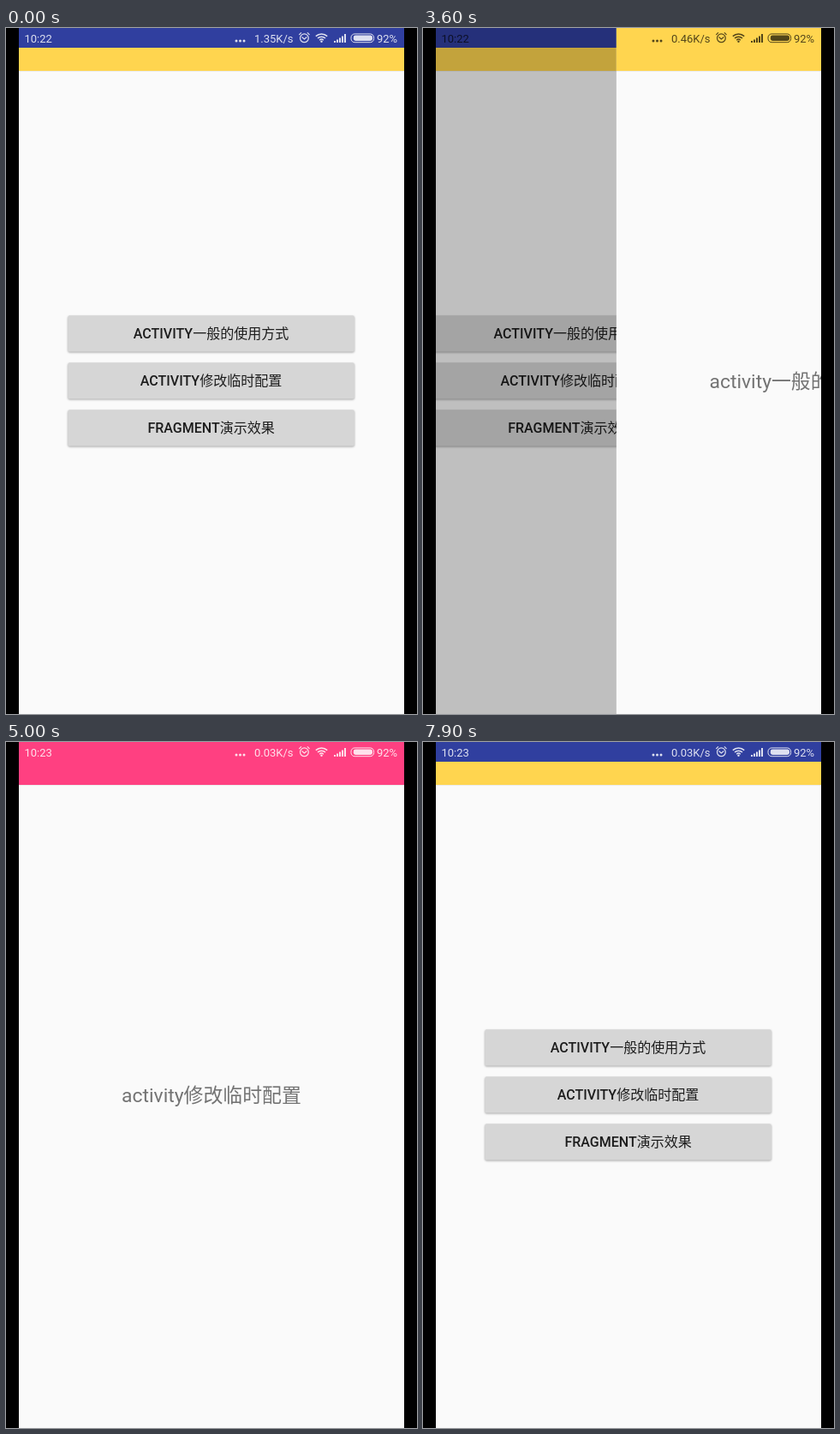
Animation, 480 px wide and 800 px high, one loop 8000 ms. Source, as an HTML page:

```html
<!DOCTYPE html>
<html lang="zh-CN">
<head>
<meta charset="utf-8">
<title>Page transitions</title>
<style>
  html, body { margin: 0; width: 100%; height: 100%; overflow: hidden; background: #000; }
  svg { display: block; width: 480px; height: 800px; }
  text { font-family: Roboto, "Noto Sans CJK SC", "Noto Sans CJK", sans-serif; }
  .label { font-size: 16.04px; text-anchor: middle; fill: #1c1c1c; }
  .label tspan { font-weight: 500; }
  .title { font-size: 22.9px; text-anchor: middle; fill: #737373; }
  .face { fill: #d6d6d6; filter: drop-shadow(0 1.3px 1.2px rgba(0, 0, 0, .32)); }
  .face.pressed { filter: drop-shadow(0 2.6px 2.4px rgba(0, 0, 0, .36)); }
  .line { fill: none; stroke: currentColor; }
  #status { fill: currentColor; font-size: 13px; }
</style>
</head>
<body>
<svg viewBox="0 0 480 800">
  <defs>
    <clipPath id="screen"><rect x="15" width="450" height="800"/></clipPath>
  </defs>
  <rect width="480" height="800"/>
  <g clip-path="url(#screen)">
    <g id="home">
      <rect x="15" width="450" height="800" fill="#fafafa"/>
      <rect x="15" width="450" height="23" fill="#303f9f"/>
      <rect x="15" y="23" width="450" height="27" fill="#ffd54f"/>
      <rect x="15" y="50" width="450" height="1" opacity=".06"/>
    </g>
    <rect id="dim" x="15" width="450" height="800"/>
    <g id="page">
      <rect x="15" width="450" height="800" fill="#fafafa"/>
      <rect id="bar" x="15" width="450" height="50"/>
      <rect x="15" y="50" width="450" height="1" opacity=".06"/>
      <text id="title" class="title" x="240" y="420.3"></text>
    </g>
    <g id="status">
      <text id="clock" x="21.5" y="17"></text>
      <text id="speed" x="335.5" y="17" text-anchor="end"></text>
      <text x="433" y="16.7">92%</text>
      <circle cx="269" cy="15" r="1.5"/>
      <circle cx="273.5" cy="15" r="1.5"/>
      <circle cx="278" cy="15" r="1.5"/>
      <g class="line" stroke-width="1.2" stroke-linecap="round">
        <circle cx="348.4" cy="11.8" r="4.9"/>
        <path d="M345.8 10.8l2.6 2.2 2.6-2.2M342.6 7.6l2-2M354.2 7.6l-2-2"/>
      </g>
      <g class="line" stroke-width="1.5">
        <path d="M361.8 9.6a9.6 9.6 0 0 1 13.4 0M364 12a6.4 6.4 0 0 1 9 0M366.2 14.2a3.3 3.3 0 0 1 4.6 0"/>
      </g>
      <circle cx="368.5" cy="15.8" r="1.2"/>
      <path d="M383 15h2v2h-2zM386 13.4h2V17h-2zM389 11.4h2V17h-2zM392 9.4h2V17h-2zM395 7h2v10h-2z"/>
      <rect class="line" x="403" y="6.9" width="26.6" height="9.8" rx="4.2"/>
      <rect x="405.8" y="8.6" width="22.2" height="6.4" rx="2.4"/>
    </g>
  </g>
</svg>
<script>
const LOOP = 8000, STEP = 100, SLIDE = 300, LAG = 11;
const $ = id => document.getElementById(id);

const buttons = [
  ['ACTIVITY', '一般的使用方式'],
  ['ACTIVITY', '修改临时配置'],
  ['FRAGMENT', '演示效果']
];
const visits = [
  { press: 1390, hold: 210, open: 1476, close: 3456, x: 340, y: 367,
    bar: '#ffd54f', title: 'activity一般的使用方式' },
  { press: 4390, hold: 110, open: 4670, close: 6677, x: 300, y: 414,
    bar: '#ff4081', title: 'activity修改临时配置' }
];
const speeds = [[0, '1.35'], [100, '0.45'], [3000, '0.46'], [4400, '0.03']];
const swaps = [1810, 3810];   // status icons turn dark, then light again

$('home').insertAdjacentHTML('beforeend', buttons.map(([latin, cjk], i) => {
  const y = 335.2 + 55 * i;
  return `<clipPath id="clip${i}"><rect x="72.3" y="${y}" width="334.6" height="42.3" rx="2"/></clipPath>
    <rect class="face" id="face${i}" x="72.3" y="${y}" width="334.6" height="42.3" rx="2"/>
    <g clip-path="url(#clip${i})"><circle id="ripple${i}" opacity=".06"/></g>
    <text class="label" x="239.6" y="${y + 27.2}"><tspan>${latin}</tspan>${cjk}</text>`;
}).join(''));

const clamp = v => Math.min(1, Math.max(0, v));
const ease = u => (1 - Math.cos(Math.PI * clamp(u))) / 2;
const cover = (v, t) => ease((t - v.open) / SLIDE) - ease((t - v.close) / SLIDE);

function statusAlpha(t) {
  return Math.min(...swaps.map(s =>
    t < s ? clamp((s - 20 - t) / 90) : 1 - (1 - clamp((t - s - 20) / 500)) ** 2));
}

function draw(t) {
  const v = visits[t < visits[1].press ? 0 : 1];
  const front = cover(v, t), back = cover(v, t - LAG);

  $('home').setAttribute('transform', `translate(${-112.5 * back})`);
  $('dim').setAttribute('opacity', 0.4 * back);
  $('page').setAttribute('transform', `translate(${450 * (1 - front)})`);
  $('bar').setAttribute('fill', v.bar);
  $('title').textContent = v.title;

  visits.forEach((w, i) => {
    const pressed = t >= w.press && t < w.open + SLIDE;
    const ripple = $('ripple' + i);
    ripple.setAttribute('cx', w.x);
    ripple.setAttribute('cy', w.y);
    ripple.setAttribute('r', pressed ? 6 + 0.176 * Math.min(t - w.press, w.hold) : 0);
    $('face' + i).classList.toggle('pressed', pressed);
  });

  const dark = t >= swaps[0] && t < swaps[1];
  $('status').style.color = dark ? 'rgba(0,0,0,.68)' : 'rgba(255,255,255,.84)';
  $('status').style.opacity = statusAlpha(t);
  $('clock').textContent = t < 4400 ? '10:22' : '10:23';
  $('speed').textContent = speeds.filter(s => t >= s[0]).pop()[1] + 'K/s';
}

const start = performance.now();
function tick() {
  const t = (performance.now() - start) % LOOP;
  draw(Math.floor(t / STEP) * STEP);
  requestAnimationFrame(tick);
}
tick();
</script>
</body>
</html>
```
